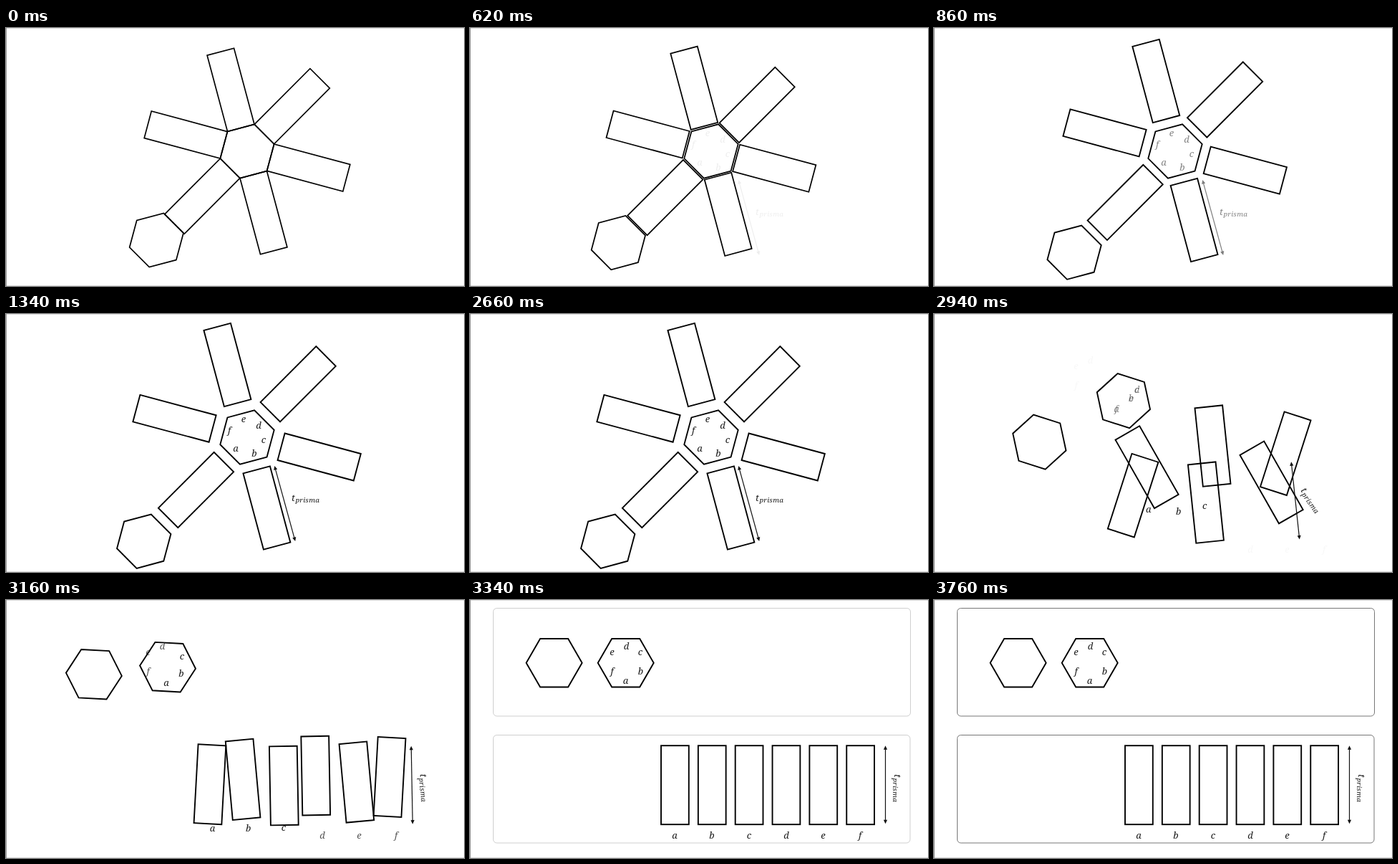
An HTML page that plays this animation: 640x360 px, repeating every 5040 ms.

```html
<!DOCTYPE html>
<html lang="en">
<head>
<meta charset="utf-8">
<title>Hexagonal prism net</title>
<style>
  html, body { margin: 0; width: 100%; height: 100%; overflow: hidden; background: #fff; }
  svg { display: block; width: 100vw; height: 100vh; }
  text { font: italic 13px "Noto Serif", "Liberation Serif", serif; fill: #1c1c1c; }
  .shape { fill: none; stroke: #000; stroke-linejoin: miter; }
  .panel { fill: none; stroke: #777; stroke-width: 1; }
</style>
</head>
<body>
<svg id="stage" viewBox="0 0 640 360">
  <rect width="640" height="360" fill="#fff"/>
  <path d="M0 .5H640M0 359.5H640" stroke="#dedede"/>
  <path d="M.5 0V360" stroke="#a0a0a0"/>
</svg>
<script>
const LOOP = 5040;
const SPREAD = { start: 568, length: 488 };
const ARRANGE = { start: 2680, length: 632 };
const PANELS = { start: 3190, length: 430 };
const LABEL_Y = 332.5;

const stage = document.getElementById('stage');
const clamp = v => Math.max(0, Math.min(1, v));
const mix = (a, b, p) => a + (b - a) * p;
const phase = (t, span) => clamp((t - span.start) / span.length);
const easeOut = u => Math.sin(u * Math.PI / 2);
const ramp = (u, from, to) => clamp((u - from) / (to - from));
const fadeIn = u => ramp(u, 0.4, 0.88);

function add(tag, attrs, parent = stage) {
  const node = document.createElementNS('http://www.w3.org/2000/svg', tag);
  for (const key in attrs) node.setAttribute(key, attrs[key]);
  return parent.appendChild(node);
}

function place(node, x, y, angle = 0) {
  node.setAttribute('transform', `translate(${x.toFixed(3)} ${y.toFixed(3)}) rotate(${angle.toFixed(3)})`);
}

function letter(char) {
  const node = add('text', { 'text-anchor': 'middle' });
  node.textContent = char;
  return node;
}

// Panels behind the final layout
const panels = [[32.5, 11.5, 583, 150.5], [32.5, 188.5, 582.5, 150.5]].map(([x, y, width, height]) =>
  add('rect', { class: 'panel', x, y, width, height, rx: 5 }));

// Shapes: folded, spread and arranged centres, plus the starting angle
const hexPoints = Array.from({ length: 6 }, (_, k) => {
  const a = k * Math.PI / 3;
  return `${39 * Math.cos(a)},${39 * Math.sin(a)}`;
}).join(' ');

const hexes = [
  { net: [337, 172], apart: [337, 172], end: [217.7, 87.8] },
  { net: [210.3, 296], apart: [192.7, 317.2], end: [117.6, 87.8] }
].map(s => ({ ...s, from: 45, to: 0, node: add('polygon', { class: 'shape', points: hexPoints }) }));

const sides = [
  { dir: 135, apart: [265.5, 245.5], slot: 0 },
  { dir: 75, apart: [364.4, 270.5], slot: 2 },
  { dir: 15, apart: [437.7, 199.5], slot: 4 },
  { dir: -45, apart: [408.2, 97.8], slot: 5 },
  { dir: -105, apart: [309.4, 71], slot: 3 },
  { dir: -165, apart: [235.5, 145.8], slot: 1 }
].map(({ dir, apart, slot }) => {
  const a = dir * Math.PI / 180;
  return {
    net: [337 + 88.7 * Math.cos(a), 172 + 88.7 * Math.sin(a)],
    apart,
    end: [286.4 + 51.85 * slot, 258.2],
    from: (dir + 180) % 180,
    to: 90,
    node: add('rect', { class: 'shape', x: -55, y: -19.4, width: 110, height: 38.8 })
  };
});
const shapes = [...hexes, ...sides];

// Letters that travel; "next" is the glyph they turn into
const movers = [
  ['a', 321, 192, 286, LABEL_Y],
  ['b', 347, 199, 338, LABEL_Y],
  ['c', 360, 180, 390, LABEL_Y],
  ['d', 353, 160, 238, 77, 'c'],
  ['e', 332, 150.5, 238.5, 104, 'b'],
  ['f', 312, 167, 217.5, 117, 'a']
].map(([char, x0, y0, x1, y1, next]) =>
  ({ x0, y0, x1, y1, node: letter(char), next: next && letter(next) }));

// Letters that appear in place
const arrivals = [
  ['d', 218.5, 69], ['e', 198.5, 77], ['f', 198.5, 104],
  ['d', 442, LABEL_Y], ['e', 493.5, LABEL_Y], ['f', 545, LABEL_Y]
].map(([char, x, y]) => {
  const node = letter(char);
  place(node, x, y);
  return node;
});

// Height arrow and its label
const arrow = add('g', {});
add('path', { d: 'M-51 0H51', stroke: '#111', 'stroke-width': 1.2 }, arrow);
add('path', { d: 'M-54.5 0l5.5 -2.6v5.2zM54.5 0l-5.5 -2.6v5.2z', fill: '#111' }, arrow);

const caption = add('g', {});
add('text', { x: -20, y: 2.5 }, caption).textContent = 't';
add('text', { x: -14.6, y: 4.8, style: 'font-size:9.8px;letter-spacing:.25px' }, caption).textContent = 'prisma';

function draw(t) {
  const u1 = phase(t, SPREAD), u2 = phase(t, ARRANGE);
  const p1 = easeOut(u1), p2 = easeOut(u2);
  const shown = u1 < 1 ? Math.pow(u1, 1.2) : 1;

  for (const s of shapes) {
    const [x, y] = [0, 1].map(i => mix(mix(s.net[i], s.apart[i], p1), s.end[i], p2));
    place(s.node, x, y, mix(s.from, s.to, p2));
    s.node.setAttribute('stroke-width', mix(1.7, 1.9, p1));
  }

  const swap = ramp(u2, 0.1, 0.7);
  for (const m of movers) {
    const x = mix(m.x0, m.x1, p2), y = mix(m.y0, m.y1, p2);
    place(m.node, x, y);
    m.node.setAttribute('opacity', m.next ? shown * (1 - swap) : shown);
    if (m.next) {
      place(m.next, x, y);
      m.next.setAttribute('opacity', swap);
    }
  }

  for (const node of arrivals) node.setAttribute('opacity', fadeIn(u2));

  place(arrow, mix(389.7, 580.5, p2), mix(264.5, 257.7, p2), mix(74.6, 90, p2));
  place(caption, mix(419, 595.5, p2), mix(258, 263, p2), 90 * p2);
  arrow.setAttribute('opacity', shown);
  caption.setAttribute('opacity', shown);

  for (const node of panels) node.setAttribute('opacity', phase(t, PANELS));
}

const begun = performance.now();
function tick() {
  draw((performance.now() - begun) % LOOP);
  requestAnimationFrame(tick);
}
draw(0);
requestAnimationFrame(tick);
</script>
</body>
</html>
```
